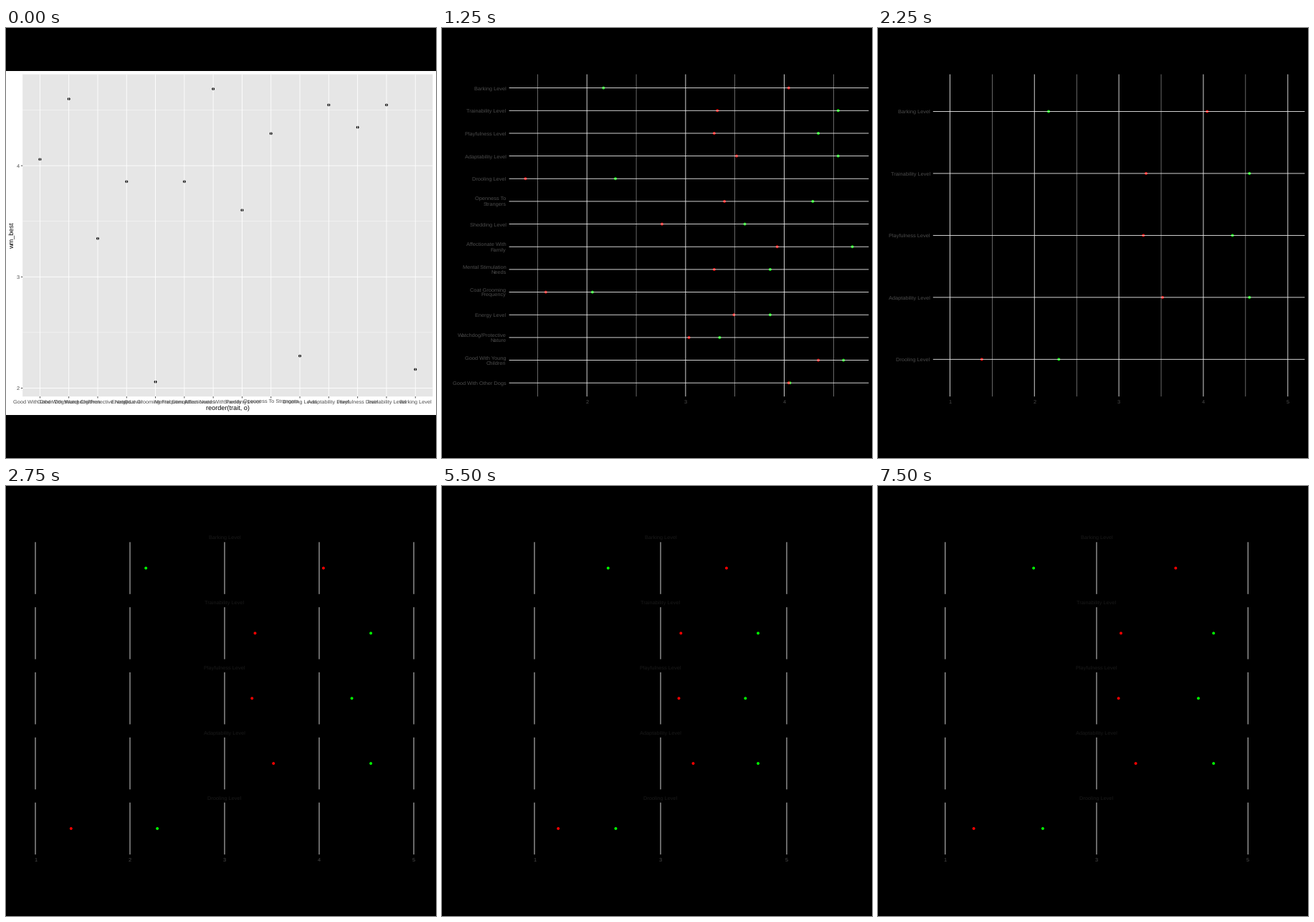
A matplotlib script that plays this animation: 600x600 px, repeating every 8000 ms.

```python
import math
import matplotlib.pyplot as plt
from matplotlib.animation import FuncAnimation
from matplotlib.patches import Circle, Rectangle

plt.rcParams["font.family"] = "Liberation Sans"
plt.rcParams["text.hinting"] = "none"
plt.rcParams["path.snap"] = False

# Traits from first to last: label, best score, worst score
TRAITS = [
    ("Good With Other Dogs", 4.057, 4.045),
    ("Good With Young\nChildren", 4.6, 4.345),
    ("Watchdog/Protective\nNature", 3.345, 3.034),
    ("Energy Level", 3.857, 3.49),
    ("Coat Grooming\nFrequency", 2.056, 1.583),
    ("Mental Stimulation\nNeeds", 3.857, 3.29),
    ("Affectionate With\nFamily", 4.69, 3.928),
    ("Shedding Level", 3.6, 2.761),
    ("Openness To\nStrangers", 4.289, 3.394),
    ("Drooling Level", 2.289, 1.377),
    ("Adaptability Level", 4.546, 3.517),
    ("Playfulness Level", 4.345, 3.29),
    ("Trainability Level", 4.546, 3.322),
    ("Barking Level", 2.168, 4.045),
]
TOP, BOTTOM, RIGHT = 64.6, 514.2, 595.4
MID_Y = (TOP + BOTTOM) / 2
MAJOR, MINOR = 1.07, 0.53
AXIS_TEXT, TICK, PANEL, GRID = "#4d4d4d", "#333333", "#e6e6e6", "#ebebeb"
BEST, WORST = "#00ff00", "#ff0000"

fig = plt.figure(figsize=(10, 10), dpi=60, facecolor="black")
ax = fig.add_axes([0, 0, 1, 1])


def line(x0, y0, x1, y1, color, width):
    ax.plot([x0, x1], [y0, y1], color=color, lw=width, solid_capstyle="butt")


def dot(x, y, color):
    ax.add_patch(Circle((x, y), 1.95, fc=color, lw=0))


def text(x, y, s, ha="center", color=AXIS_TEXT, size=8.8, rotation=0):
    ax.text(x, y, s, ha=ha, va="baseline", color=color, size=size,
            rotation=rotation, rotation_mode="anchor")


def side_label(x, y, label):
    rows = label.split("\n")
    for i, row in enumerate(rows):
        text(x, y + 2.5 + 7.9 * (i - (len(rows) - 1) / 2), row, "right")


def scale(lo, hi, start, end, pad=0.05):
    """Map lo..hi, widened on both sides by a share of the range, to pixels."""
    grow = (hi - lo) * pad
    lo, hi = lo - grow, hi + grow
    return lo, hi, lambda v: start + (v - lo) / (hi - lo) * (end - start)


def halves(lo, hi):
    return [k / 2 for k in range(math.ceil(lo * 2), math.floor(hi * 2) + 1)]


def page(left, x_title, y_title):
    ax.add_patch(Rectangle((0, 60), 600, 480, fc="white", lw=0))
    ax.add_patch(Rectangle((left, TOP), RIGHT - left, BOTTOM - TOP, fc=PANEL, lw=0))
    text((left + RIGHT) / 2, 533.4, x_title, color="black", size=11)
    text(11.2, MID_Y, y_title, color="black", size=11, rotation=90)


def upright_plot():
    left = 23.2
    page(left, "reorder(trait, o)", "wm_best")
    lo, hi, ypos = scale(2.056, 4.69, BOTTOM, TOP)
    step = (RIGHT - left) / (len(TRAITS) + 0.2)
    for v in halves(lo, hi):
        whole = v == int(v)
        line(left, ypos(v), RIGHT, ypos(v), "white", MAJOR if whole else MINOR)
        if whole:
            line(left - 2.3, ypos(v), left, ypos(v), TICK, MAJOR)
            side_label(left - 4.1, ypos(v), str(int(v)))
    for i, (label, best, _) in enumerate(TRAITS):
        x = left + (i + 0.6) * step
        line(x, TOP, x, BOTTOM, "white", MAJOR)
        line(x, BOTTOM, x, BOTTOM + 2.3, TICK, MAJOR)
        text(x, 523.6, label.replace("\n", " "))
        dot(x, ypos(best), "black")


def flat_plot(left=93.6, limits=(1.377, 4.69), traits=TRAITS, paper=False,
              pair=True, wrap=True):
    if paper:
        page(left, "wm_best", "reorder(trait, o)")
    grid = "white" if paper else GRID
    lo, hi, xpos = scale(*limits, left, RIGHT)
    step = (BOTTOM - TOP) / (len(traits) + 0.2)
    for v in halves(lo, hi):
        whole = v == int(v)
        line(xpos(v), TOP, xpos(v), BOTTOM, grid, MAJOR if whole else MINOR)
        if whole:
            if paper:
                line(xpos(v), BOTTOM, xpos(v), BOTTOM + 2.3, TICK, MAJOR)
            text(xpos(v), 523.6, str(int(v)))
    for i, (label, best, worst) in enumerate(traits):
        y = BOTTOM - (i + 0.6) * step
        line(left, y, RIGHT, y, grid, MAJOR)
        if paper:
            line(left - 2.3, y, left, y, TICK, MAJOR)
        side_label(left - 4.1, y, label if wrap else label.replace("\n", " "))
        dot(xpos(best), y, BEST if pair else "black")
        if pair:
            dot(xpos(worst), y, WORST)


def facets(limits=(1, 5), breaks=(1, 3, 5), rows=False, bar=False):
    height, pitch = 72.5, 90.85
    _, _, xpos = scale(*limits, 14.6, RIGHT)
    for i, (label, best, worst) in enumerate(reversed(TRAITS[-5:])):
        bottom = BOTTOM - (4 - i) * pitch
        y = bottom - height / 2
        text(305, bottom - height - 4.3, label, color="#1a1a1a")
        for v in breaks:
            line(xpos(v), bottom - height, xpos(v), bottom, GRID, MAJOR)
        if rows:
            line(14.6, y, RIGHT, y, GRID, MAJOR)
        if bar:
            line(xpos(1), y, xpos(5), y, "black", 6.4)
        dot(xpos(best), y, BEST)
        dot(xpos(worst), y, WORST)
    for v in breaks:
        text(xpos(v), 523.6, str(v))


ALL_BREAKS = (1, 2, 3, 4, 5)
# Start time in ms, plot, its settings
SCENES = [
    (0, upright_plot, {}),
    (500, flat_plot, dict(left=111.5, limits=(2.056, 4.69), paper=True,
                          pair=False, wrap=False)),
    (750, flat_plot, dict(limits=(2.056, 4.69), paper=True, pair=False)),
    (1000, flat_plot, dict(paper=True)),
    (1250, flat_plot, {}),
    (1500, flat_plot, dict(limits=(1, 5))),
    (2000, flat_plot, dict(left=76.8, limits=(1, 5), traits=TRAITS[-5:])),
    (2500, facets, dict(breaks=ALL_BREAKS, rows=True)),
    (2750, facets, dict(breaks=ALL_BREAKS)),
    (3500, facets, {}),
    (5500, facets, dict(limits=(0, 6))),
    (6500, facets, dict(limits=(0.5, 5.5))),
    (7000, facets, dict(limits=(0.5, 5.5), bar=True)),
    (7500, facets, dict(limits=(0.5, 5.5))),
]
INTERVAL = 250


def draw(frame):
    ax.clear()
    ax.set_axis_off()
    _, plot, settings = [s for s in SCENES if s[0] <= frame * INTERVAL][-1]
    plot(**settings)
    ax.set_xlim(0, 600)
    ax.set_ylim(600, 0)
    return []


anim = FuncAnimation(fig, draw, frames=8000 // INTERVAL, interval=INTERVAL,
                     init_func=lambda: [], repeat=True, repeat_delay=0)
plt.show()
```
